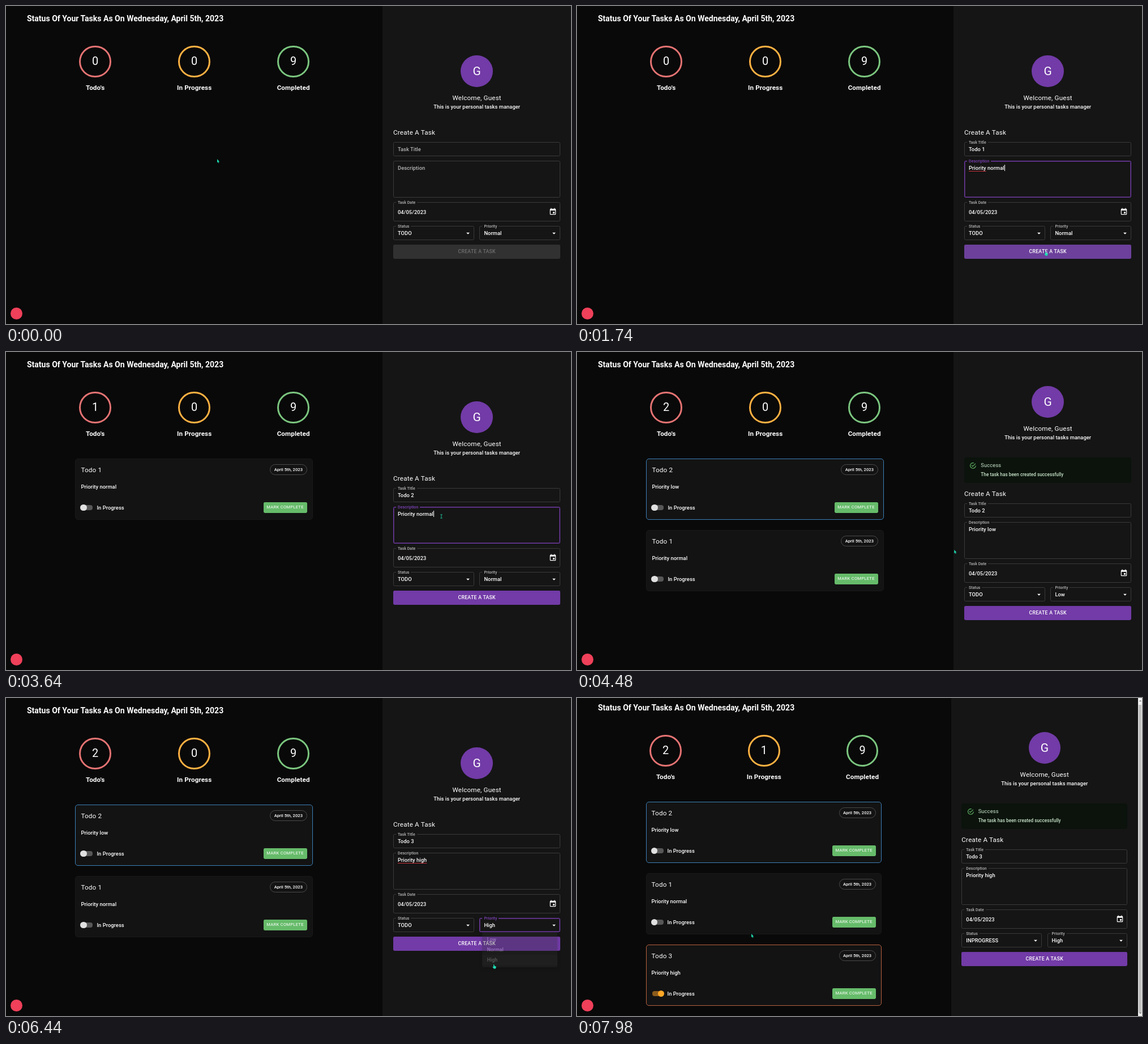
An HTML page for the animation above (8 s loop, 998x561 px).

```html
<!DOCTYPE html>
<html lang="en">
<head>
<meta charset="utf-8">
<title>Task manager</title>
<style>
:root { --purple: #723ba7; --panel: #151515; --line: #3a3a3a; }
html, body { margin: 0; width: 100%; height: 100%; overflow: hidden; background: #090909; }
body { position: relative; color: #fff; font: 500 9.354px Roboto, sans-serif; letter-spacing: .005em; }
body * { box-sizing: border-box; }
#app, #left, #panel, #form, #who, #form *, #who *, .card, .card *, .stat, .stat *, #alert, #alert *, #bar, #bar *, #badge, #cursor, #cursor * { position: absolute; }
#app { inset: 0 auto 0 0; }
#left { left: 0; top: 0; width: 66.6667%; height: 100%; }
#panel { left: 66.6667%; right: 0; top: 0; height: 100%; background: var(--panel); }
/* text whose top is the middle of its line */
.t { position: absolute; line-height: 20px; margin-top: -10px; white-space: pre; }
.h6 { font-size: 11.69px; font-weight: 400; letter-spacing: .014em; }
.mid { left: 50%; transform: translateX(-50%); }
#head { left: 37px; top: 22px; font-size: 14.03px; font-weight: 700; letter-spacing: 0; }
.stat { top: 0; width: 0; }
.ring { left: -28.3px; top: 69.7px; width: 56.6px; height: 56.6px; border: 3px solid; border-radius: 50%; }
.num { top: 98px; font-size: 19.9px; font-weight: 400; letter-spacing: .00735em; }
.stat .h6 { top: 143.5px; font-weight: 700; letter-spacing: .0075em; }
.card { left: 18.4%; width: 63%; height: 108px; border: 1px solid #191919; border-radius: 5px; background: #131313; }
.card > .t { left: 9px; }
.card .pill { left: auto; right: 9px; top: 9px; height: 19px; margin: 0; padding: 0 6.5px; border: 1px solid #4a4a4a; border-radius: 10px; font-size: 7.6px; line-height: 17px; letter-spacing: .05px; }
.card .done { left: auto; right: 9px; top: 76.3px; height: 18.4px; margin: 0; padding: 0 5.85px; border-radius: 2.4px; background: #66bb6a; font-size: 7.6px; font-weight: 400; line-height: 18.4px; letter-spacing: .035em; }
.track { left: 10px; top: 81.4px; width: 20px; height: 8.2px; border-radius: 4.1px; background: #575757; }
.knob { left: 8px; top: 79.6px; width: 11.8px; height: 11.8px; border-radius: 50%; background: #e0e0e0; }
.on .track { background: #8b5c1c; }
.on .knob { left: 20px; background: #ffa726; }
#who, #form { top: 0; height: 0; }
#who { left: 0; width: 100%; }
#form, #alert { left: 18.7px; right: 18.7px; }
#face { left: 50%; top: 86.7px; width: 56.6px; height: 56.6px; margin-left: -28.3px; border-radius: 50%; background: var(--purple); }
#alert { top: 186px; height: 44.5px; border-radius: 4px; background: #0b130c; color: #cce8cd; }
#alert svg { left: 9.3px; top: 7.6px; width: 12.9px; height: 12.9px; fill: #66bb6a; }
.f { left: 0; width: 100%; border: 1px solid var(--line); border-radius: 2.5px; }
.f.half { width: calc(50% - 4.7px); }
.f.over { border-color: #aaa; }
.f.focus { border-color: var(--purple); box-shadow: inset 0 0 0 .5px var(--purple); }
.f .label { left: 4px; top: 0; padding: 0 3px; line-height: 8px; margin-top: -4px; font-size: 7.015px; background: var(--panel); color: #b6b6b6; }
.f.empty .label { top: 12px; font-size: 9.354px; background: none; }
.f.focus .label { color: #7f43b8; }
.f .text { left: 7px; top: 12px; }
.text * { position: static !important; }
.text u { text-decoration: underline solid #c62f3a 1px; text-underline-offset: 1.5px; }
.text i { display: inline-block; width: 1px; height: 11px; margin-left: .5px; vertical-align: -2px; background: #fff; }
.f svg { right: 3px; top: 5px; width: 14px; height: 14px; fill: #fff; }
#create { left: 0; width: 100%; top: 421px; height: 25px; border-radius: 2.4px; background: var(--purple); font-size: 8.77px; line-height: 25px; letter-spacing: .02857em; text-align: center; }
#create.over { background: #6c409b; }
#create.off { background: #313131; color: #6f6f6f; }
.menu { top: 413px; width: calc(50% - 4.7px); border-radius: 2.4px; padding: 4.2px 0; background: #2d2d2d; box-shadow: 0 3px 8px #0007; transform-origin: 50% 0; }
.menu div { position: static !important; height: 21px; padding-left: 9.4px; line-height: 21px; }
.menu .sel { background: #3c3048; }
.menu .over { background: #3a3a3a; }
#bar { right: -7px; top: 0; width: 7px; height: 100%; background: #f1f1f1; }
#bar b { left: 1px; width: 5px; top: 12px; height: 543px; background: #c1c1c1; }
#bar i { left: 1.5px; border: 2px solid transparent; }
#badge { left: 8px; top: 531.5px; width: 21px; height: 21px; border-radius: 50%; background: #f0405a; }
#cursor { left: 0; top: 0; width: 10px; height: 12px; overflow: visible; fill: #1fdcb4; }
</style>
</head>
<body>
<div id="app">
  <div id="left"><div class="t" id="head">Status Of Your Tasks As On Wednesday, April 5th, 2023</div></div>
  <div id="panel">
    <div id="who">
      <div id="face"></div>
      <div class="t mid" style="top:115px;font-size:21px;font-weight:400;letter-spacing:0">G</div>
      <div class="t mid h6" style="top:161.5px">Welcome, Guest</div>
      <div class="t mid" style="top:178px">This is your personal tasks manager</div>
    </div>
    <div id="alert">
      <svg viewBox="0 0 24 24"><path d="M20 12a8 8 0 1 1-5.8-7.7l1.6-1.6A10 10 0 1 0 22 12zM7.9 10.1 6.5 11.5 11 16 21 6 19.6 4.6 11 13.2z"/></svg>
      <div class="t" style="left:29.3px;top:14.3px;font-weight:400;letter-spacing:.014em">Success</div>
      <div class="t" style="left:29.3px;top:30.3px;font-size:8.185px">The task has been created successfully</div>
    </div>
    <div id="form"><div class="t h6" style="left:0;top:222.5px">Create A Task</div></div>
  </div>
  <div id="bar"><b></b><i style="top:2px;border-bottom-color:#666"></i><i style="bottom:2px;border-top-color:#666"></i></div>
</div>
<div id="badge"></div>
<svg id="cursor"><path></path></svg>
<script>
const LOOP = 8000;
const $ = id => document.getElementById(id);
const clamp = v => Math.max(0, Math.min(1, v));

function add(parent, cls, text = '', css = '') {
  const el = document.createElement('div');
  el.className = cls;
  el.textContent = text;
  el.style.cssText = css;
  parent.append(el);
  return el;
}
function icon(parent, path, css = '') {
  parent.insertAdjacentHTML('beforeend', `<svg viewBox="0 0 24 24" style="${css}"><path d="${path}"/></svg>`);
  return parent.lastElementChild;
}
function put(el, text) { if (el.textContent !== text) el.textContent = text; }
function show(el, on) { el.style.display = on ? '' : 'none'; }

// last value whose start time has passed
function step(t, list) {
  let value = list[0][1];
  for (const [from, v] of list) if (t >= from) value = v;
  return value;
}
// text after deleting to the common start and typing the rest
function typed(t, edits) {
  let now = '';
  for (const [from, to, next] of edits) {
    if (t < from) break;
    let same = 0;
    while (same < now.length && now[same] === next[same]) same++;
    const cut = now.length - same;
    const keys = Math.floor(clamp((t - from) / (to - from)) * (cut + next.length - same));
    now = keys <= cut && t < to ? now.slice(0, now.length - keys) : next.slice(0, same + keys - cut);
  }
  return now;
}

// counters
const nums = [["Todo's", '#e57373', 23.7], ['In Progress', '#ffb142', 50], ['Completed', '#7bc67f', 76.3]].map(([name, color, x]) => {
  const stat = add($('left'), 'stat', '', `left:${x}%`);
  add(stat, 'ring', '', `border-color:${color}`);
  const num = add(stat, 't num mid', '9');
  add(stat, 't h6 mid', name);
  return num;
});

// cards
const cards = [['1', 'normal', ''], ['2', 'low', '#3d80b8'], ['3', 'high', '#b9623f']].map(([n, level, edge]) => {
  const card = add($('left'), n === '3' ? 'card on' : 'card', '', edge && `border-color:${edge}`);
  add(card, 't h6', 'Todo ' + n, 'top:18.5px');
  add(card, 'pill t', 'April 5th, 2023');
  add(card, 't', 'Priority ' + level, 'top:49px');
  add(card, 'track');
  add(card, 'knob');
  add(card, 't', 'In Progress', 'left:37px;top:85.5px');
  add(card, 'done t', 'MARK COMPLETE');
  return card;
});

// form
const DOWN = 'M7 10l5 5 5-5z', UP = 'M7 14l5-5 5 5z';
const DAY = 'M17 12h-5v5h5zM16 1v2H8V1H6v2H5a2 2 0 0 0-2 2v14a2 2 0 0 0 2 2h14a2 2 0 0 0 2-2V5a2 2 0 0 0-2-2h-1V1zm3 18H5V8h14z';
function field(name, top, height, cls = '', css = '') {
  const box = add($('form'), 'f ' + cls, '', `top:${top}px;height:${height}px;${css}`);
  add(box, 't label', name);
  const text = add(box, 't text');
  return { box, text };
}
const title = field('Task Title', 240, 25);
const desc = field('Description', 273, 64.5);
const date = field('Task Date', 346, 33.5);
const status = field('Status', 388, 25, 'half');
const priority = field('Priority', 388, 25, 'half', 'left:auto;right:0');
date.text.textContent = '04/05/2023';
date.text.style.top = '16.5px';
icon(date.box, DAY, 'right:5px;top:9px');
for (const f of [status, priority]) f.arrow = icon(f.box, DOWN).firstChild;
for (const f of [title, desc]) f.text.innerHTML = '<u></u><span></span><i></i>';
const fields = { title, desc, status, priority };

const create = add($('form'), '', 'CREATE A TASK');
create.id = 'create';
function menu(side, items) {
  const el = add($('form'), 'menu', '', side + ':0');
  items.forEach(item => add(el, '', item));
  return el;
}
const statusMenu = menu('left', ['TODO', 'INPROGRESS']);
const priorityMenu = menu('right', ['Low', 'Normal', 'High']);

function inside(el, x, y) {
  const r = el.getBoundingClientRect();
  return x >= r.left && x < r.right && y >= r.top && y < r.bottom;
}

// returns true while the menu takes the pointer
function drawMenu(el, f, t, spans, value, x, y) {
  const span = spans.find(([a, b]) => t >= a && t < b + 100);
  show(el, span);
  const open = Boolean(span) && t < span[1];
  f.arrow.setAttribute('d', open ? UP : DOWN);
  if (!span) return false;
  const out = clamp((t - span[1]) / 100);
  const rise = 1 - clamp((t - span[0]) / 80);
  const shrink = open ? rise ** 2 : clamp((out - .33) / .67) ** 2.2;
  el.style.opacity = open ? 1 - rise : 1 - out;
  el.style.transform = `scale(${1 - .25 * shrink},${1 - .4375 * shrink})`;
  for (const item of el.children) {
    item.className = inside(item, x, y) ? 'over' : open && item.textContent === value ? 'sel' : '';
  }
  return inside(el, x, y);
}

function drawText(f, text, focus, marked, caret) {
  const [u, rest, bar] = f.text.children;
  put(u, text.slice(0, marked));
  put(rest, text.slice(marked));
  show(bar, focus && caret);
  f.box.classList.toggle('empty', !text && !focus);
}

// pointer stops: time, x, y
const path = [
  [40, 373, 270], [120, 765, 330], [700, 765, 330], [760, 750, 386], [820, 745, 193], [880, 740, 254],
  [1120, 740, 254], [1180, 735, 300], [1560, 735, 300], [1720, 827, 433], [1980, 827, 433], [2200, 402, 240],
  [2620, 402, 240], [2740, 760, 180], [2800, 990, 215], [2880, 760, 282], [3440, 760, 282], [3520, 769, 290],
  [3820, 769, 290], [3900, 900, 401], [3960, 900, 401], [4040, 862, 428], [4160, 862, 428], [4240, 830, 434],
  [4380, 830, 434], [4600, 457, 240], [4980, 457, 240], [5120, 740, 280], [5500, 740, 280], [5600, 765, 290],
  [5960, 765, 290], [6040, 900, 401], [6260, 900, 401], [6360, 861, 470], [6500, 861, 470], [6740, 744, 411],
  [7100, 744, 411], [7160, 720, 448], [7240, 720, 448], [7380, 830, 434], [7560, 830, 434], [7760, 619, 335],
  [7920, 619, 335], [7980, 308, 416]
];
function pointer(t) {
  let i = path.findIndex(p => p[0] > t);
  if (i < 0) return path[path.length - 1].slice(1);
  if (!i) return path[0].slice(1);
  const [a, ax, ay] = path[i - 1], [b, bx, by] = path[i];
  const p = (t - a) / (b - a), e = p * p * (3 - 2 * p);
  return [ax + (bx - ax) * e, ay + (by - ay) * e];
}
const SHAPES = {
  arrow: 'M0 0V6.3L1.4 5.1 2.3 7.2 3.3 6.8 2.4 4.7H4.2Z',
  hand: 'M0 0.5Q.7-.5 1.4 .5V2.6L4.6 3.4V5.6L3.8 7.6H.6L-1.6 4.6-1 3.9 0 4.6Z',
  beam: 'M-1.8-3.5H1.8V-2.8H.4V2.8H1.8V3.5H-1.8V2.8H-.4V-2.8H-1.8Z'
};

function draw(t) {
  const wide = t < 7560;
  const alert = (t >= 1980 && t < 3320) || (t >= 4380 && t < 5500) || !wide;
  const shift = alert ? 27 : 0;
  const scroll = 5 * clamp((t - 7620) / 100);
  const [x, y] = pointer(t);

  $('app').style.width = (wide ? 998 : 991) + 'px';
  show($('bar'), !wide);
  $('left').style.transform = `translateY(${-scroll}px)`;
  $('who').style.transform = `translateY(${-shift}px)`;
  $('form').style.transform = `translateY(${shift}px)`;
  show($('alert'), alert);

  put(nums[0], step(t, [[0, '0'], [1980, '1'], [4380, '2']]));
  put(nums[1], wide ? '0' : '1');
  const order = step(t, [[0, []], [1980, [0]], [4380, [1, 0]], [7560, [1, 0, 2]]]);
  cards.forEach((card, i) => {
    const slot = order.indexOf(i);
    show(card, slot >= 0);
    card.style.top = 188 + 126 * slot + 'px';
  });

  const focus = step(t, [[0, ''], [880, 'title'], [1180, 'desc'], [1860, ''], [2880, 'title'], [3520, 'desc'], [3900, 'priority'],
    [4260, ''], [5120, 'title'], [5600, 'desc'], [6040, 'priority'], [6740, 'status'], [7400, '']]);
  const beat = t % 1000, caret = beat >= 480 || beat < 120;
  const note = typed(t, [[1220, 1540, 'Priority normal'], [3680, 3840, 'Priority low'], [5680, 5900, 'Priority high']]);
  drawText(title, typed(t, [[890, 970, 'Todo 1'], [2960, 3100, 'Todo 2'], [5200, 5290, 'Todo 3']]),
    focus === 'title', step(t, [[0, 0], [5240, 4], [5500, 0]]), caret);
  drawText(desc, note, focus === 'desc', step(t, [[0, 0], [1440, 8], [1980, 0], [5880, 13], [7560, 0]]), caret);

  const state = t < 7160 ? 'TODO' : 'INPROGRESS';
  const level = step(t, [[0, 'Normal'], [4060, 'Low'], [6370, 'High']]);
  put(status.text, state);
  put(priority.text, level);
  const onStatus = drawMenu(statusMenu, status, t, [[6760, 7160]], state, x, y);
  const onPriority = drawMenu(priorityMenu, priority, t, [[3920, 4060], [6060, 6370]], level, x, y);
  const onMenu = onStatus || onPriority;

  for (const [name, f] of Object.entries(fields)) {
    f.box.classList.toggle('focus', name === focus);
    f.box.classList.toggle('over', !onMenu && name !== focus && inside(f.box, x, y));
  }
  const onCreate = !onMenu && inside(create, x, y);
  create.className = !note ? 'off' : onCreate ? 'over' : '';

  const onText = inside(title.box, x, y) || inside(desc.box, x, y);
  const shape = onText ? 'beam' : onMenu || onCreate ? 'hand' : 'arrow';
  $('cursor').firstElementChild.setAttribute('d', SHAPES[shape]);
  $('cursor').style.transform = `translate(${x}px,${y}px)`;
  show($('cursor'), t < 5180 || t >= 5500);
}

const start = performance.now();
function tick() {
  draw((performance.now() - start) % LOOP);
  requestAnimationFrame(tick);
}
tick();
</script>
</body>
</html>
```
